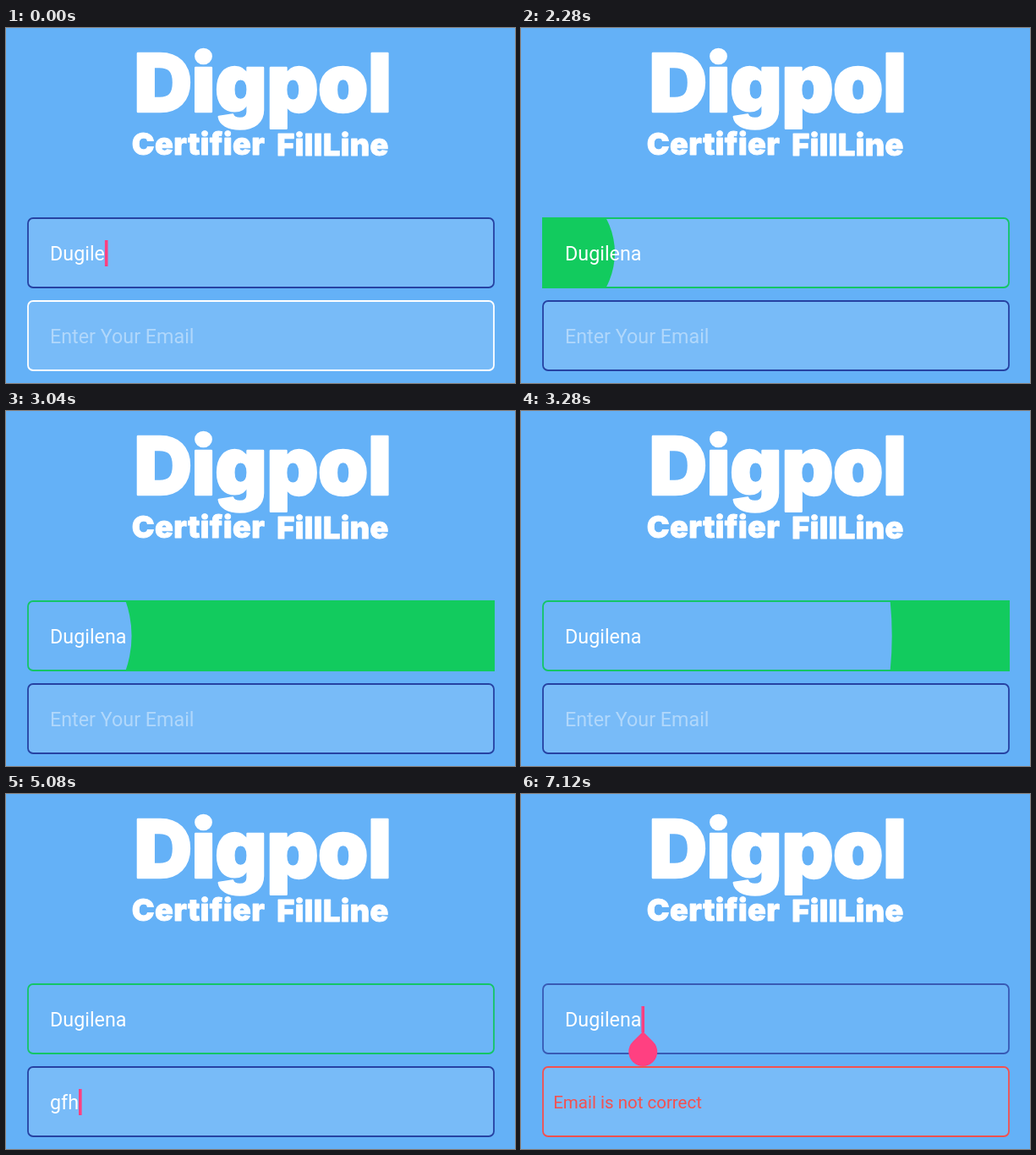
Recreate the animation shown at these times as an HTML page with a canvas. Size 602x420 px, loop 7520 ms.

```html
<!DOCTYPE html>
<html lang="en">
<head>
<meta charset="utf-8">
<title>Validated form fields</title>
<style>
  html, body { margin: 0; width: 100%; height: 100%; overflow: hidden; background: #64b1f7; }
  canvas { display: block; width: 100%; height: 100%; }
</style>
</head>
<body>
<canvas id="stage" width="602" height="420"></canvas>
<script>
const ctx = document.getElementById('stage').getContext('2d');
const LOOP = 7520, TICK = 40;
const BG = '#64b1f7', WHITE = '#fff', NAVY = '#2642a2', NAVY_SOFT = '#385ab4';
const GREEN = '#12cb5e', GREEN_LINE = '#14c566', RED = '#f4504f', PINK = '#ff4081';
const BODY = '23.3px Roboto, sans-serif';
const NAME_Y = 224, MAIL_Y = 322, TEXT_X = 52;
const FIELD = { x: 25, w: 553, h: 84 };

// Each track lists [start time, value]; the last one reached applies.
const nameText = [[0, 'Dugile'], [240, 'Dugilen'], [560, 'Dugilena']];
const mailText = [[0, ''], [4640, 'g'], [4880, 'gf'], [5080, 'gfh'], [5320, 'gfhg'], [5520, 'gfhgh'], [6080, '']];
const nameLine = [[0, NAVY], [1560, WHITE], [2000, GREEN_LINE], [5680, NAVY_SOFT]];
const mailLine = [[0, WHITE], [1560, NAVY], [5680, WHITE], [6080, RED]];
const nameCaret = [[0, true], [1040, false], [1480, true], [1560, false], [5680, true], [6160, false], [6520, true], [7000, false], [7120, true]];
const mailCaret = [[0, false], [1560, true], [2000, false], [2520, true], [3040, false], [3560, true], [3960, false], [4640, true], [5680, false]];

// Green sweep: a disc grows from the left edge, then a hole follows it.
const SWEEP = { fill: 2103, clear: 2825, span: 690, reach: 559 };
const ERROR_AT = 6520, HANDLE_AT = 7120;

const clamp = v => Math.min(1, Math.max(0, v));
const easeInOut = p => (1 - Math.cos(Math.PI * p)) / 2;
const at = (track, t) => track.reduce((value, [start, next]) => t >= start ? next : value, track[0][1]);
const sweepRadius = (t, start) => SWEEP.reach * easeInOut(clamp((t - start) / SWEEP.span));

function label(text, x, y, font, color, align = 'left') {
  ctx.font = font;
  ctx.fillStyle = color;
  ctx.textAlign = align;
  ctx.fillText(text, x, y);
}

function heading(text, x, y, size, spacing, weight) {
  ctx.letterSpacing = spacing + 'px';
  label(text, x, y, `900 ${size}px Inter, sans-serif`, WHITE, 'center');
  ctx.strokeStyle = WHITE;
  ctx.lineWidth = weight;
  ctx.lineJoin = 'round';
  ctx.strokeText(text, x, y);
  ctx.letterSpacing = '0px';
}

function box(y, line, tint) {
  ctx.beginPath();
  ctx.roundRect(FIELD.x + 1, y + 1, FIELD.w - 2, FIELD.h - 2, 6);
  ctx.fillStyle = `rgba(255,255,255,${tint})`;
  ctx.fill();
  ctx.strokeStyle = line;
  ctx.lineWidth = 1.8;
  ctx.stroke();
}

function sweep(outer, inner) {
  if (outer <= 0 || inner >= SWEEP.reach) return;
  const cy = NAME_Y + FIELD.h / 2;
  ctx.save();
  ctx.beginPath();
  ctx.rect(FIELD.x, NAME_Y, FIELD.w, FIELD.h);
  ctx.clip();
  ctx.beginPath();
  ctx.arc(FIELD.x, cy, outer, 0, Math.PI * 2);
  ctx.arc(FIELD.x, cy, inner, 0, Math.PI * 2);
  ctx.fillStyle = GREEN;
  ctx.fill('evenodd');
  ctx.restore();
}

function nameField(t) {
  const filled = sweepRadius(t, SWEEP.fill), cleared = sweepRadius(t, SWEEP.clear);
  box(NAME_Y, at(nameLine, t), cleared > 0 ? 0.05 : 0.13);
  sweep(filled, cleared);
}

function caret(x, y) {
  ctx.fillStyle = PINK;
  ctx.fillRect(x, y, 3.6, 31);
}

function entry(text, y, showCaret) {
  ctx.font = BODY;
  const end = TEXT_X + ctx.measureText(text).width;
  if (showCaret) caret(end, y + 27);
  label(text, TEXT_X, y + 51, BODY, WHITE);
  return end;
}

function handle(x) {
  const cy = 305, r = 17, d = r * Math.SQRT1_2;
  ctx.fillStyle = PINK;
  ctx.beginPath();
  ctx.moveTo(x, cy - r * Math.SQRT2);
  ctx.lineTo(x + d, cy - d);
  ctx.arc(x, cy, r, -Math.PI / 4, Math.PI * 1.25);
  ctx.closePath();
  ctx.fill();
}

function errorText(t) {
  if (t < ERROR_AT) return;
  const p = clamp((t - ERROR_AT) / 400);
  ctx.save();
  ctx.beginPath();
  ctx.rect(38, MAIL_Y + 4, 500, FIELD.h - 8);
  ctx.clip();
  ctx.globalAlpha = 0.5 + 0.5 * p;
  label('Email is not correct', 38.2 - 9 * (1 - p) ** 2, MAIL_Y + 50, '20.5px Roboto, sans-serif', RED);
  ctx.restore();
}

function draw(t) {
  ctx.fillStyle = BG;
  ctx.fillRect(0, 0, 602, 420);
  heading('Digpol', 303.5, 98.5, 95, -0.5, 2.5);
  heading('Certifier', 227.5, 149.5, 36, 0.4, 0.8);
  heading('FillLine', 386.5, 150.5, 36, 0.4, 0.8);

  nameField(t);
  const end = entry(at(nameText, t), NAME_Y, at(nameCaret, t));

  box(MAIL_Y, at(mailLine, t), 0.13);
  const mail = at(mailText, t);
  entry(mail, MAIL_Y, at(mailCaret, t));
  if (!mail && t < 6080) label('Enter Your Email', TEXT_X, MAIL_Y + 51, BODY, 'rgba(255,255,255,0.42)');
  errorText(t);
  if (t >= HANDLE_AT) handle(end + 1.8);
}

const began = performance.now();
function frame() {
  const t = (performance.now() - began) % LOOP;
  draw(Math.floor(t / TICK) * TICK);
  requestAnimationFrame(frame);
}
frame();
</script>
</body>
</html>
```
